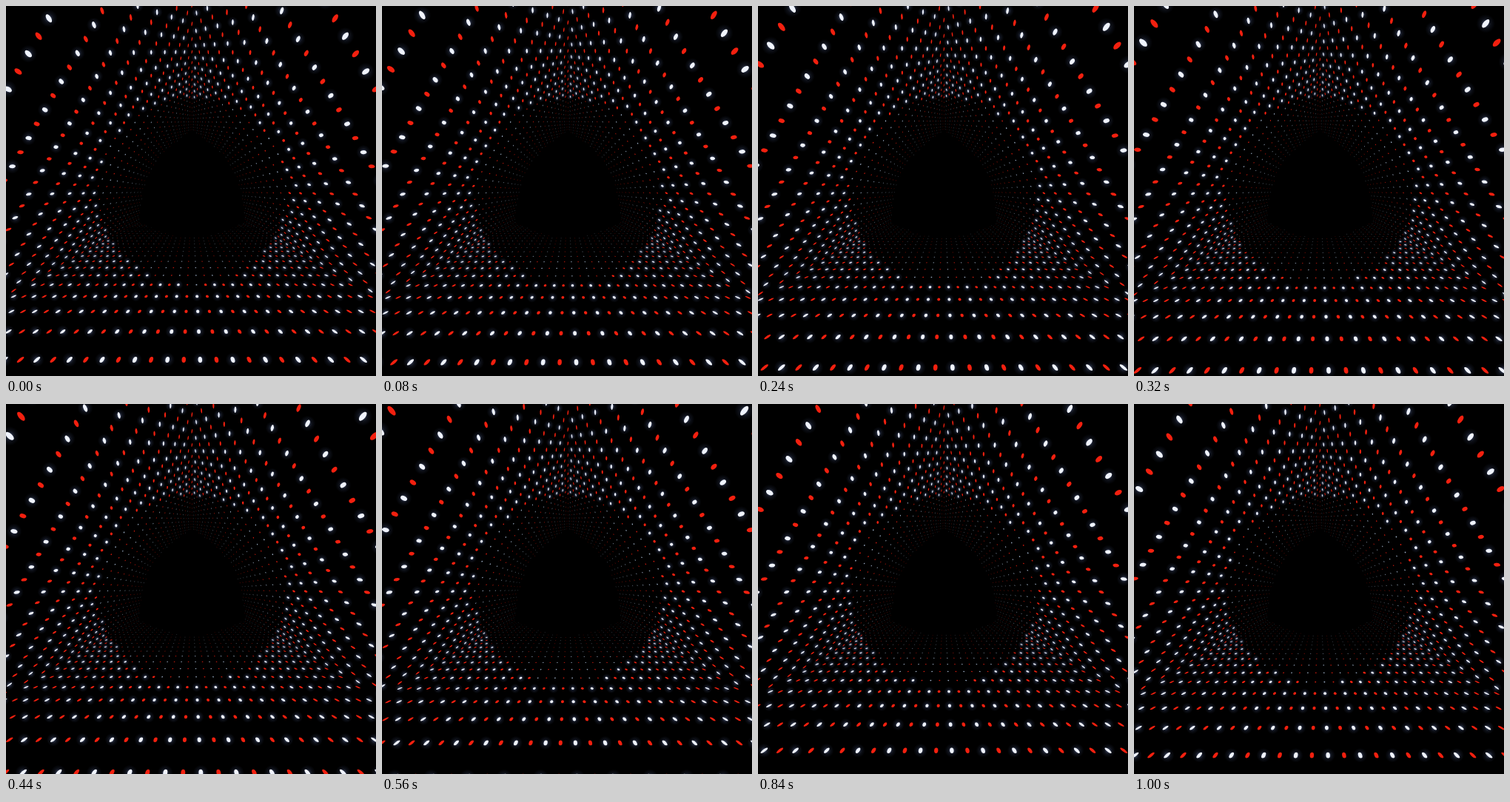
Write an HTML page with a canvas that moves like this. It is 500 by 500 pixels and loops after 1.04 s.

```html
<!DOCTYPE html>
<html lang="en">
<head>
<meta charset="utf-8">
<title>Triangular light tunnel</title>
<style>
  html, body { margin: 0; width: 100%; height: 100%; overflow: hidden; background: #000; }
  canvas { display: block; width: 100vw; height: 100vh; }
</style>
</head>
<body>
<canvas id="stage" width="500" height="500"></canvas>
<script>
const ctx = document.getElementById('stage').getContext('2d');

const LOOP = 1040, STEP = 40;
const STEPS_PER_RING = 27;                    // the loop restarts one step early
const CX = 251.3, CY = 250.7;
const COUNT = 107;                            // lights around one ring
const PITCH = 6 * Math.sqrt(3) / COUNT;       // spacing for a wall at distance 1
const NEAR = 0.0044, RING_GAP = 0.000885;     // ring depths, as 1 / wall distance
const DIM_RADIUS = 127, HOLE = 62;
const WHITE = '#f0f4ff', DIM_WHITE = '#b4c8e2', RED = '#f3200f';

const halo = ctx.createRadialGradient(0, 0, 0.8, 0, 0, 3.6);
halo.addColorStop(0, 'rgba(150,172,235,0.30)');
halo.addColorStop(0.4, 'rgba(120,145,215,0.11)');
halo.addColorStop(1, 'rgba(100,130,210,0)');

// Each column of lights runs straight down the tunnel along one direction.
const columns = Array.from({ length: COUNT }, (_, i) => {
  const k = i - (COUNT - 1) / 2;
  const place = k + 0.5;
  const wall = Math.round(place * 3 / COUNT);
  const along = (place - wall * COUNT / 3) * PITCH;
  const angle = -wall * 2 * Math.PI / 3;
  const tx = Math.cos(angle), ty = Math.sin(angle);
  return { tx, ty, x: tx * along - ty, y: ty * along + tx, white: k % 2 === 0 };
});

function disc(radius, fill) {
  ctx.fillStyle = fill;
  ctx.beginPath();
  ctx.arc(0, 0, radius, 0, 2 * Math.PI);
  ctx.fill();
}

function drawLight({ tx, ty, x, y, white }, size) {
  const dx = x * size, dy = y * size;
  const px = CX + dx, py = CY + dy;
  if (px < -30 || px > 530 || py < -30 || py > 530) return;

  const radius = Math.hypot(dx, dy);
  const depth = (size * radius ** 1.4) ** (1 / 2.4);
  if (depth < HOLE) return;

  const dim = radius < DIM_RADIUS;
  const wide = 0.6 + size * 0.0095, long = 0.006 + size * 0.00005;
  ctx.globalAlpha = dim ? Math.min(0.85, 0.4 + (depth - HOLE) * 0.01) : 1;
  if (white && !dim) {
    ctx.setTransform(wide, 0, 0, wide, px, py);
    disc(3.6, halo);
  }
  // A round light lying on the wall, seen in perspective.
  ctx.setTransform(tx * wide, ty * wide, dx * long, dy * long, px, py);
  disc(dim ? 0.55 : 1, white ? (dim ? DIM_WHITE : WHITE) : RED);
}

function draw(time) {
  const phase = Math.floor((time % LOOP) / STEP) / STEPS_PER_RING;
  ctx.setTransform(1, 0, 0, 1, 0, 0);
  ctx.globalAlpha = 1;
  ctx.fillStyle = '#000';
  ctx.fillRect(0, 0, 500, 500);
  for (let ring = 25; ring >= -2; ring--) {
    const size = 1 / (NEAR + RING_GAP * (ring - phase));
    for (const column of columns) drawLight(column, size);
  }
}

const start = performance.now();
function tick() {
  draw(performance.now() - start);
  requestAnimationFrame(tick);
}
tick();
</script>
</body>
</html>
```
